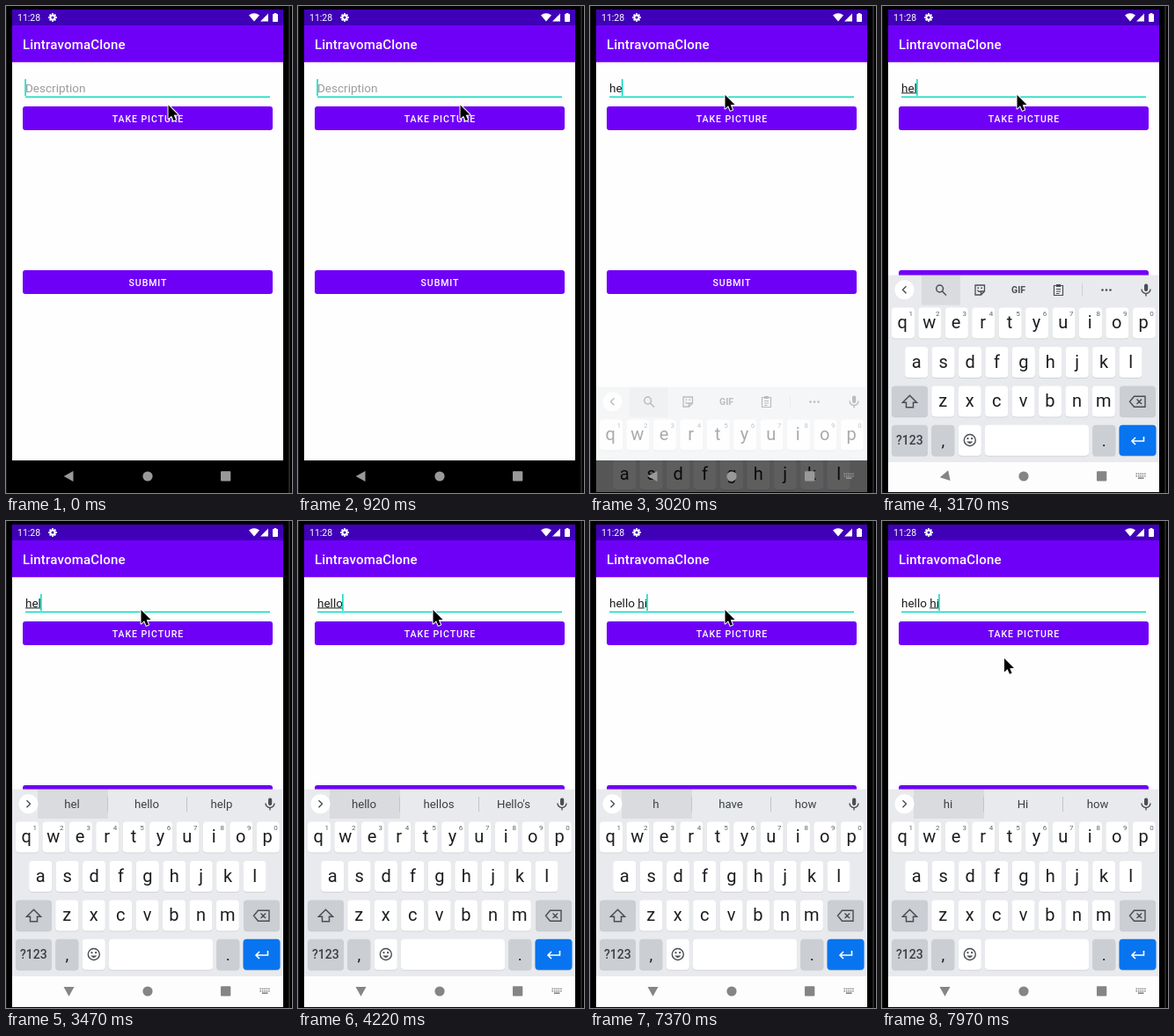
Recreate the animation shown at these times as an HTML page with a canvas. Size 325x553 px, loop 8 s.

```html
<!DOCTYPE html>
<html lang="en">
<head>
<meta charset="utf-8">
<title>Phone screen: typing a description</title>
<style>
  html, body { margin: 0; width: 100%; height: 100%; overflow: hidden; background: #000; }
  canvas { display: block; width: 325px; height: 553px; }
</style>
</head>
<body>
<canvas id="stage"></canvas>
<script>
const W = 325, H = 553, LOOP = 8000;
const dpr = window.devicePixelRatio || 1;

function setup(canvas) {
  canvas.width = W * dpr;
  canvas.height = H * dpr;
  const context = canvas.getContext('2d');
  context.scale(dpr, dpr);
  return context;
}

const screen2d = setup(document.getElementById('stage'));
const layer2d = setup(document.createElement('canvas'));
let ctx = screen2d;

const PURPLE = '#6f00f8', DEEP = '#4000b8', TEAL = '#00dabb';
const INK = '#1c1d20', SOFT = '#5f6368', ICON = '#4a4d51';

// Timelines: [start ms, ...values]; each entry holds until the next one.
const TYPED = [
  [0, ''], [2720, 'h'], [2870, 'he'], [3170, 'hel', 0, 3], [3920, 'hello', 0, 4],
  [4220, 'hello', 0, 5], [4970, 'hello ', 0, 5], [5270, 'hello '],
  [7070, 'hello h'], [7370, 'hello hi', 6, 7], [7520, 'hello hi', 6, 8]
];
const CARET = [
  [0, 1], [330, 0], [920, 1], [1370, 0], [1970, 1], [2420, 0], [2720, 1],
  [4670, 0], [4970, 1], [5720, 0], [6170, 1], [6770, 0], [7070, 1]
];
const POINTER = [
  [0, 184.5, 112.5], [1670, 173, 108], [1820, 159, 103], [1970, 153.5, 101],
  [7520, 151, 110], [7670, 146, 128], [7820, 141, 146], [7970, 139, 156]
];
// Panel values: drop in px, opacity, rotation of the back icon.
const PANEL = [[0, 248, 0, 0], [3020, 128, 0.37, 0], [3170, 1, 1, -0.2], [3320, 0, 1, -Math.PI / 2]];
const HINTS = [
  [0], [3470, 'hel', 'hello', 'help'], [3920, 'hell', 'hello', "he'll"],
  [4220, 'hello', 'hellos', "Hello's"], [5270, 'my', 'world', 'I'],
  [7370, 'h', 'have', 'how'], [7520, 'hi', 'Hi', 'how']
];

function at(list, t) {
  let hit = list[0];
  for (const entry of list) if (entry[0] <= t) hit = entry;
  return hit.slice(1);
}

function rect(x, y, w, h, color) {
  ctx.fillStyle = color;
  ctx.fillRect(x, y, w, h);
}

function round(x, y, w, h, r, color) {
  ctx.fillStyle = color;
  ctx.beginPath();
  ctx.roundRect(x, y, w, h, r);
  ctx.fill();
}

function disc(x, y, r, color) {
  ctx.fillStyle = color;
  ctx.beginPath();
  ctx.arc(x, y, r, 0, Math.PI * 2);
  ctx.fill();
}

function ring(x, y, r, width, color) {
  ctx.strokeStyle = color;
  ctx.lineWidth = width;
  ctx.beginPath();
  ctx.arc(x, y, r, 0, Math.PI * 2);
  ctx.stroke();
}

// The outline goes under the fill.
function shape(d, x, y, fill, stroke, width = 1.3) {
  const path = new Path2D(d);
  ctx.save();
  ctx.translate(x, y);
  if (stroke) { ctx.strokeStyle = stroke; ctx.lineWidth = width; ctx.stroke(path); }
  if (fill) { ctx.fillStyle = fill; ctx.fill(path); }
  ctx.restore();
}

function text(str, x, y, size, color, { weight = 400, align = 'left', spacing = 0 } = {}) {
  ctx.font = `${weight} ${size}px Roboto, sans-serif`;
  ctx.letterSpacing = spacing + 'px';
  ctx.textAlign = align;
  ctx.fillStyle = color;
  ctx.fillText(str, x, y);
}

function drawStatusBar() {
  rect(7, 4, 308, 18, DEEP);
  text('11:28', 13, 17, 10.5, '#fff');
  for (let i = 0; i < 8; i++) {
    ctx.save();
    ctx.translate(53, 13);
    ctx.rotate(i * Math.PI / 4);
    rect(-1, -4.8, 2, 3, '#fff');
    ctx.restore();
  }
  disc(53, 13, 3.6, '#fff');
  disc(53, 13, 1.5, DEEP);
  shape('M0 4.5 L-6 -2.5 Q0 -7 6 -2.5 Z', 282, 13, '#fff');
  shape('M0 9 L9 0 V9 Z', 289, 8.5, '#fff');
  round(303, 9, 6, 9, 0.8, '#fff');
  rect(304.7, 8, 2.6, 1.2, '#fff');
}

function drawButton(label, y) {
  round(19, y, 284, 27, 3, PURPLE);
  text(label, 161.5, y + 17.6, 10.5, '#fff', { weight: 500, align: 'center', spacing: 0.94 });
}

function drawField(t) {
  const [str, from, to] = at(TYPED, t);
  text(str || 'Description', 22, 97.6, 13.5, str ? INK : '#9c9c9c');
  const width = s => ctx.measureText(s).width;
  if (to) {
    const x = 22 + width(str.slice(0, from));
    rect(x, 98.4, width(str.slice(from, to)), 1, INK);
  }
  rect(22, 102.6, 278, 1.4, TEAL);
  if (at(CARET, t)[0]) rect(21.3 + width(str), 83, 1.5, 19, TEAL);
}

function drawKey(cx, y, w, color = '#fff') {
  round(cx - w / 2, y + 0.8, w, 35, 4, '#c9ccd0');
  round(cx - w / 2, y, w, 35, 4, color);
}

function drawLetters(row, x, y, numbered) {
  [...row].forEach((ch, i) => {
    const cx = x + i * 30.42;
    drawKey(cx, y, 26);
    text(ch, cx - (numbered ? 0.7 : 0), y + 24, 20, INK, { align: 'center' });
    if (numbered) text((i + 1) % 10, cx + 8.8, y + 9.5, 8, SOFT, { align: 'center' });
  });
}

function drawMic() {
  round(298, 314.5, 4.2, 8.5, 2.1, ICON);
  shape('M-5 0 A5 5 0 0 0 5 0 M0 5 V8', 300, 320.5, null, ICON, 1.4);
}

function drawTools() {
  rect(45, 305, 44, 33.5, '#d9dbde');
  ring(65.6, 320, 3.9, 1.5, ICON);
  shape('M0 0 L4.5 4.5', 68.5, 323, null, ICON, 1.5);
  shape('M-5 -5.5 H5.5 V1.5 L1.5 5.5 H-5 Z M1.5 5 V1.5 H5 M-2.5 0 Q-1 3 1.5 1', 111, 321.5, null, ICON);
  disc(109.3, 319.2, 0.9, ICON);
  disc(113.2, 319.2, 0.9, ICON);
  text('GIF', 155, 325.3, 10.5, ICON, { weight: 700, align: 'center' });
  shape('M-5 -5 H5 V6 H-5 Z M-2.5 -1 H2.5 M-2.5 1.5 H2.5 M-2.5 4 H1', 200.5, 321.5, null, ICON, 1.2);
  rect(198, 315, 5, 3, ICON);
  rect(227, 314, 1, 15, '#cfd1d4');
  for (const x of [250.5, 255, 259.5]) disc(x, 321.5, 1.3, ICON);
}

function drawHints(words) {
  rect(36, 305, 80, 33, '#d9dbde');
  words.forEach((word, i) => text(word, 75 + i * 85, 326, 13.2, '#3c4043', { align: 'center' }));
  rect(115, 313, 1, 17, '#c2c5c9');
  rect(205, 313, 1, 17, '#c2c5c9');
}

function drawKeyboard(words) {
  const grey = '#cbced3';
  rect(7, 304.6, 308, 213, '#e8eaed');
  rect(7, 517, 308, 36, '#fdfdfd');

  if (words.length) drawHints(words);
  else drawTools();
  disc(25.5, 321.2, 11, '#fff');
  shape(words.length ? 'M-2 -4 L2 0 L-2 4' : 'M2 -4 L-2 0 L2 4', 25.5, 321.2, null, ICON, 1.4);
  drawMic();

  drawLetters('qwertyuiop', 24, 341.4, true);
  drawLetters('asdfghjkl', 39.2, 386);
  drawLetters('zxcvbnm', 69.3, 430.4);

  drawKey(31.5, 430.4, 41, grey);
  shape('M0 -7 L8 1 H4 V6.5 H-4 V1 H-8 Z', 31.5, 448.3, null, ICON, 1.5);
  drawKey(290.5, 430.4, 41, grey);
  shape('M-9 0 L-4 -6 H8.5 V6 H-4 Z M-1 -2.8 L4.6 2.8 M4.6 -2.8 L-1 2.8', 290.5, 448.3, null, ICON, 1.4);

  drawKey(31.5, 474.8, 41, grey);
  text('?123', 31.3, 497, 14, '#3c4043', { weight: 500, align: 'center' });
  drawKey(69.3, 474.8, 26, grey);
  text(',', 69.3, 499, 19, INK, { align: 'center' });
  drawKey(99.8, 474.8, 26);
  ring(99.8, 492, 6.5, 1.4, ICON);
  disc(97.5, 490.2, 1.1, ICON);
  disc(102.1, 490.2, 1.1, ICON);
  shape('M-3.5 1.6 Q0 6.5 3.5 1.6 Z', 99.8, 492, ICON);
  drawKey(176, 474.8, 118);
  drawKey(252.3, 474.8, 26, grey);
  text('.', 252.3, 499, 19, INK, { align: 'center' });
  drawKey(290.5, 474.8, 42, '#0874f0');
  shape('M7 -4.5 V0.5 H-6.5 M-2.5 -3.5 L-6.5 0.5 L-2.5 4.5', 290.5, 492.5, null, '#fff', 1.6);
}

// Paint the keyboard on its own layer so that it fades as a whole.
function drawPanel(words, drop, alpha) {
  ctx = layer2d;
  ctx.clearRect(0, 0, W, H);
  drawKeyboard(words);
  ctx = screen2d;
  ctx.globalAlpha = alpha;
  ctx.drawImage(layer2d.canvas, 0, drop, W, H);
  ctx.globalAlpha = 1;
}

function drawNav(shown, turn) {
  const color = shown === 1 ? '#858585' : '#999';
  ctx.save();
  ctx.translate(71.5, 534);
  ctx.rotate(turn);
  shape('M-5.8 0 L5 -6 V6 Z', 0, 0, color);
  ctx.restore();
  disc(161, 534, 5.6, color);
  round(244, 528.3, 11.3, 11.3, 1, color);
  if (!shown) return;
  for (let row = 0; row < 3; row++)
    for (let col = 0; col < 5; col++)
      if (row < 2 || (col > 0 && col < 4)) rect(288.5 + col * 2.4, 530.5 + row * 2.5, 1.5, 1.5, color);
  rect(291, 535.5, 6.4, 1.4, color);
}

function drawPointer(x, y) {
  ctx.lineJoin = 'round';
  shape('M0 0 V15.5 L3.6 12.2 L6 17.8 L8.6 16.7 L6.2 11.2 L11 11 Z', x, y, '#000', '#fff', 2);
  ctx.lineJoin = 'miter';
}

function draw(t) {
  rect(0, 0, W, H, '#000');
  rect(0, 0, 1, H, '#1c1c1c');
  rect(321, 0, 2, H, '#242424');

  ctx.save();
  ctx.beginPath();
  ctx.rect(7, 4, 308, 548);
  ctx.clip();
  rect(7, 22, 308, 494, '#fefefe');
  drawStatusBar();
  rect(7, 22, 308, 41.8, PURPLE);
  text('LintravomaClone', 19, 48.8, 15, '#fff', { weight: 500, spacing: 0.19 });
  drawField(t);
  drawButton('TAKE PICTURE', 114);
  drawButton('SUBMIT', 300);

  const [drop, alpha, turn] = at(PANEL, t);
  if (alpha) drawPanel(at(HINTS, t), drop, alpha);
  drawNav(alpha, turn);
  ctx.restore();

  drawPointer(...at(POINTER, t));
}

const start = performance.now();
function tick(now) {
  draw(Math.max(0, now - start) % LOOP);
  requestAnimationFrame(tick);
}
draw(0);
requestAnimationFrame(tick);
</script>
</body>
</html>
```
